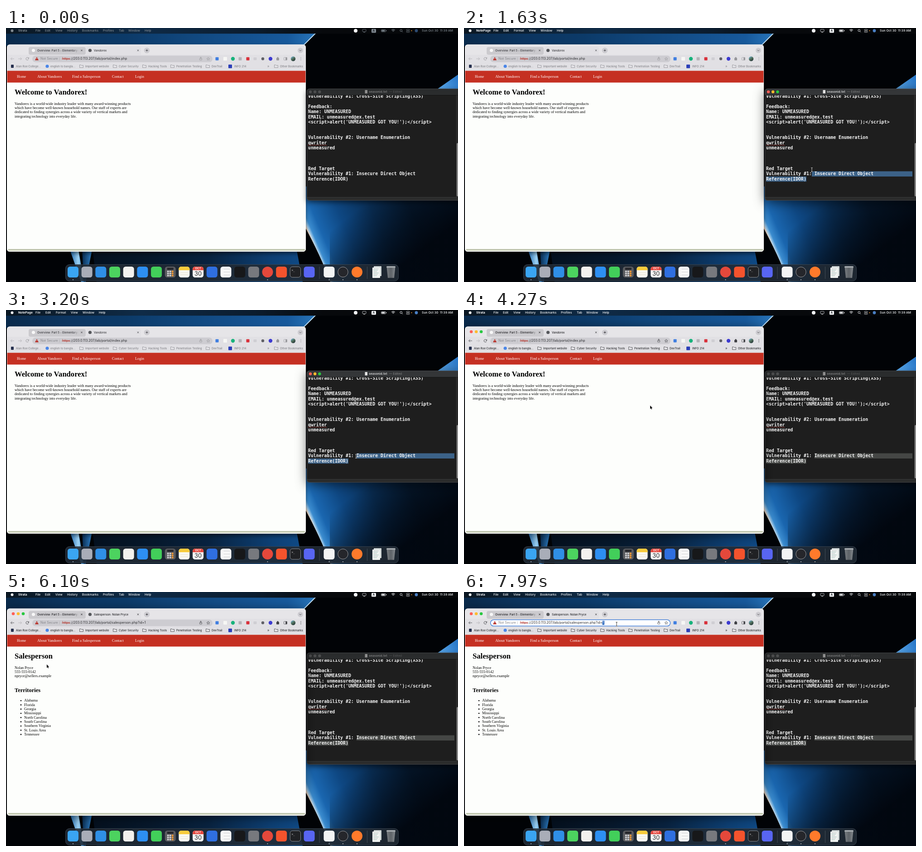
Write an HTML page with a canvas that moves like this. It is 998 px wide and 561 px high and loops after 8 s.

```html
<!DOCTYPE html>
<html lang="en">
<head>
<meta charset="utf-8">
<title>Desktop session</title>
<style>
html, body { margin: 0; width: 100%; height: 100%; overflow: hidden; background: #000; }
canvas { display: block; width: 100vw; height: 100vh; }
</style>
</head>
<body>
<canvas id="stage"></canvas>
<script>
const W = 998, H = 561, LOOP = 8000;
const canvas = document.getElementById('stage');
const g = canvas.getContext('2d');
const dpr = window.devicePixelRatio || 1;
canvas.width = W * dpr;
canvas.height = H * dpr;

const SANS = 'Inter, Roboto, sans-serif';
const SERIF = '"Liberation Serif", "Noto Serif", serif';
const MONO = '"DejaVu Sans Mono", "Liberation Mono", monospace';
const HOST = '203.0.113.207/lab/portal/';

// Moments of the hard changes, in ms
const EDITOR_FOCUS = 1000, DRAG_START = 1150, DRAG_END = 1780;
const BROWSER_FOCUS = 4250, LOAD_START = 5250, LOAD_END = 6000, URL_FOCUS = 7300;

// Pointer path: time, x, y
const PATH = [
  [0, 772, 5], [150, 772, 5], [720, 809, 341], [860, 809, 341], [1000, 757, 334],
  [1150, 757, 334], [1600, 768, 313], [1650, 768, 313], [1780, 773, 323], [3300, 773, 323],
  [4150, 420, 220], [4300, 410, 210], [4950, 178, 107], [5220, 178, 107], [5370, 126, 137],
  [5700, 60, 168], [6000, 60, 168], [6450, 293, 106], [6640, 293, 106], [6770, 329, 78],
  [7100, 337, 71], [8000, 337, 71]
];

const NOTES = {
  0: 'Vulnerability #1: Cross-Site Scripting(XSS)',
  2: 'Feedback:',
  3: 'Name: UNMEASURED',
  4: 'EMAIL: unmeasured@ex.test',
  5: "<script>alert('UNMEASURED GOT YOU!');<\/script>",
  8: 'Vulnerability #2: Username Enumeration',
  9: 'qwriter',
  10: 'unmeasured',
  14: 'Red Target',
  15: 'Vulnerability #1: Insecure Direct Object',
  16: 'Reference(IDOR)'
};

const STATES = ['Alabama', 'Florida', 'Georgia', 'Mississippi', 'North Carolina',
  'South Carolina', 'Southern Virginia', 'St. Louis Area', 'Tennessee'];

const STRIP = '#e6e5e8', BAR = '#e1e0e4', PILL = '#cdccd1';

function rect(x, y, w, h, color, r = 0) {
  g.fillStyle = color;
  g.beginPath();
  g.roundRect(x, y, w, h, r);
  g.fill();
}

function disc(x, y, r, color) {
  g.fillStyle = color;
  g.beginPath();
  g.arc(x, y, r, 0, 7);
  g.fill();
}

function ring(x, y, r, color, width = 0.8, from = 0, to = 2 * Math.PI) {
  g.strokeStyle = color;
  g.lineWidth = width;
  g.beginPath();
  g.arc(x, y, r, from, to);
  g.stroke();
}

function trace(points) {
  g.beginPath();
  for (let i = 0; i < points.length; i += 2) g.lineTo(points[i], points[i + 1]);
}

function poly(points, color) {
  trace(points);
  g.fillStyle = color;
  g.fill();
}

function line(points, color, width = 0.8) {
  trace(points);
  g.strokeStyle = color;
  g.lineWidth = width;
  g.stroke();
}

function box(x, y, w, h, color, r = 1, width = 0.7) {
  g.strokeStyle = color;
  g.lineWidth = width;
  g.beginPath();
  g.roundRect(x, y, w, h, r);
  g.stroke();
}

// y is the optical middle of the line; returns the advance width
function text(s, x, y, size, color, family = SANS, weight = 400) {
  g.font = `${weight} ${size}px ${family}`;
  g.fillStyle = color;
  g.fillText(s, x, y + size * 0.34);
  return g.measureText(s).width;
}

function ramp(x0, y0, x1, y1, stops) {
  const grad = g.createLinearGradient(x0, y0, x1, y1);
  for (const [at, color] of stops) grad.addColorStop(at, color);
  return grad;
}

function withShadow(blur, paint) {
  g.save();
  g.shadowColor = 'rgba(0,0,0,.55)';
  g.shadowBlur = blur * dpr;
  g.shadowOffsetY = 4 * dpr;
  paint();
  g.restore();
}

function pointerAt(t) {
  let i = 1;
  while (i < PATH.length - 1 && PATH[i][0] < t) i++;
  const [t0, x0, y0] = PATH[i - 1], [t1, x1, y1] = PATH[i];
  const u = Math.min(1, Math.max(0, (t - t0) / (t1 - t0)));
  const e = u * u * (3 - 2 * u);
  return { x: x0 + (x1 - x0) * e, y: y0 + (y1 - y0) * e };
}

function drawWallpaper() {
  rect(0, 0, W, H, '#010306');
  // upper band, closed by a bright diagonal rim
  poly([0, 0, 695, 0, 655, 40, 0, 40], ramp(0, 0, 690, 40, [
    [0, '#0a2a4b'], [0.2, '#0c3560'], [0.38, '#0c3a68'], [0.6, '#11487f'], [0.9, '#17599c'], [1, '#2a78bd']]));
  line([694, 1, 655, 40], '#bcdcf2', 2);
  // right wedge
  poly([998, 103, 998, 140, 945, 140], ramp(955, 133, 998, 115, [[0, '#5aa8ea'], [1, '#2a78c8']]));
  // lower right sweep
  g.beginPath();
  g.moveTo(655, 350);
  g.lineTo(998, 350);
  g.lineTo(998, 561);
  g.lineTo(716, 561);
  g.quadraticCurveTo(696, 505, 655, 430);
  g.fillStyle = ramp(690, 505, 900, 415, [
    [0, '#ecd0b8'], [0.015, '#a5cdea'], [0.04, '#3b8ccf'], [0.12, '#1a66af'],
    [0.35, '#0e4782'], [0.65, '#092e55'], [1, '#061d36']]);
  g.fill();
  rect(715, 381, 283, 180, ramp(745, 425, 840, 550, [
    [0, 'rgba(1,5,12,0)'], [0.6, 'rgba(1,5,12,.6)'], [1, 'rgba(1,5,12,.92)']]));
  // lower band
  poly([190, 480, 640, 480, 655, 561, 200, 561], ramp(190, 0, 655, 0, [
    [0, '#04101e'], [0.3, '#06182c'], [0.55, '#08223f'], [0.85, '#0d3f73'], [1, '#0f4a86']]));
  poly([141, 490, 160, 490, 172, 561, 166, 561], ramp(141, 0, 172, 0, [[0, '#1d66ab'], [0.6, '#9dd2f3'], [1, '#2b7cc4']]));
  poly([168, 490, 190, 490, 176, 561, 172, 561], ramp(168, 0, 190, 0, [[0, '#0a2c50'], [1, '#2d7fc6']]));
}

function drawMenuBar(t) {
  const awake = t >= EDITOR_FOCUS;
  const inEditor = awake && t < BROWSER_FOCUS;
  const ink = awake ? '#f2f4f6' : '#7f8890';
  rect(0, 0, W, 12.5, ramp(0, 0, W, 0, [
    [0, '#0b1722'], [0.3, '#0f2b47'], [0.55, '#0b1c2e'], [0.7, '#07090c'], [1, '#06080a']]));
  disc(13.5, 6, 3, ink);
  const items = inEditor
    ? [['File', 65], ['Edit', 87], ['Format', 110], ['View', 143], ['Window', 169], ['Help', 205]]
    : [['File', 65], ['Edit', 86], ['View', 109], ['History', 135], ['Bookmarks', 168],
      ['Profiles', 214], ['Tab', 249], ['Window', 270], ['Help', 306]];
  text(inEditor ? 'NotePage' : 'Strata', 27, 6, 6.7, ink, SANS, 700);
  for (const [label, x] of items) text(label, x, 6, 6.7, ink, SANS, 500);

  disc(772, 6, 4, t < 200 ? '#ffffff' : ink);
  box(787, 3, 8, 5, ink);
  line([789, 9.5, 793, 9.5], ink);
  rect(807, 2, 10, 8.5, ink, 1.5);
  text('A', 809.6, 6.2, 6.5, '#15191d', SANS, 600);
  box(828.5, 3.5, 10, 5, ink, 1.5);
  rect(829.5, 4.5, 7, 3, ink, 0.7);
  rect(839.3, 5, 1, 2, ink);
  for (const r of [2, 4, 6]) ring(855, 9, r, ink, 1, -2.3, -0.84);
  ring(872.3, 5.4, 2.3, ink, 0.9);
  line([874, 7.2, 876, 9.2], ink, 0.9);
  for (const y of [3, 7]) box(884, y, 7, 2.6, ink, 1.3);
  disc(895.5, 6, 1.1, '#f29a2e');
  disc(906, 6, 3.4, awake ? '#4a7fc4' : '#2c4a70');
  text('Sun Oct 30  11:39 AM', 918, 6, 6.8, ink, SANS, 500);
}

function folder(x, y, color) {
  line([x - 4, y + 3, x - 4, y - 3, x - 1, y - 3, x, y - 2, x + 4, y - 2, x + 4, y + 3, x - 4, y + 3], color, 0.7);
}

function cross(x, y, r, color) {
  line([x - r, y - r, x + r, y + r], color, 0.9);
  line([x - r, y + r, x + r, y - r], color, 0.9);
}

function drawTabs(t, active, loading) {
  rect(50, 42, 126, 17, '#cbcace', 4);
  rect(177, 41, 121, 22, BAR, 5);
  const ink = active ? '#232326' : '#3c3c40';
  if (active) [['#fe5f57', 16], ['#febb2e', 27], ['#28c840', 38]].forEach(([c, x]) => disc(x, 48, 3.3, c));
  disc(60.5, 49.5, 3.6, '#f8f8f8');
  g.save();
  g.beginPath();
  g.rect(68, 42, 92, 17);
  g.clip();
  text('Overview: Part 5 - Elementary C', 69, 49.5, 6.2, ink, SANS, 500);
  g.restore();
  rect(148, 44, 13, 12, ramp(148, 0, 161, 0, [[0, 'rgba(203,202,206,0)'], [1, '#cbcace']]));
  cross(167, 49.5, 1.7, ink);
  if (loading) ring(185, 49.5, 3.3, '#aaa9ae', 0.8, t / 130, t / 130 + 1.4);
  else disc(185.5, 49.5, 3.6, '#55575b');
  text(t < LOAD_END ? 'Vandorex' : 'Salesperson: Nolan Pryce', 194, 49.5, 6.2, ink, SANS, 500);
  cross(291.5, 49.5, 1.7, ink);
  disc(311, 49.5, 6.3, PILL);
  line([308.5, 49.5, 313.5, 49.5], ink, 0.9);
  line([311, 47, 311, 52], ink, 0.9);
  disc(650, 49.5, 6, PILL);
  line([647.8, 48.5, 650, 50.7, 652.2, 48.5], ink);
}

function drawUrl(t, typing) {
  const size = 7.3;
  let x = 124;
  const w = text('https', x, 68, size, '#b3352c');
  line([x - 0.5, 68.3, x + w, 68.3], '#b3352c', 0.8);
  x += w;
  const page = t < LOAD_END ? 'index.php' : 'salesperson.php?id=';
  x += text('://' + HOST + page, x, 68, size, '#2c2d30');
  if (t < LOAD_END) return;
  if (typing) rect(x - 0.2, 63.5, 4.6, 9, '#2766bd');
  text('1', x, 68, size, typing ? '#fff' : '#2c2d30');
}

function drawToolbar(t, active, loading) {
  const ink = active ? '#404145' : '#97979b';
  const faint = '#aeadb2';
  const typing = t >= URL_FOCUS;
  rect(2, 59, 660, 35.5, BAR);
  line([18, 68, 10.5, 68], active ? ink : faint);
  line([13.5, 65, 10.5, 68, 13.5, 71], active ? ink : faint);
  line([27, 68, 34.5, 68], faint);
  line([31.5, 65, 34.5, 68, 31.5, 71], faint);
  if (loading) cross(47, 68, 2.6, ink);
  else {
    ring(47, 68, 3, ink, 0.9, 0.4, 5.6);
    poly([50.8, 64.5, 50.8, 67.8, 47.6, 67.8], ink);
  }

  rect(58, 61, 398, 14.5, typing ? '#ffffff' : PILL, 7.2);
  if (typing) box(58.5, 61.4, 397, 13.8, '#2f73d8', 7, 1.3);
  poly([68, 64, 72, 71.3, 64, 71.3], '#b3261e');
  line([68, 66.6, 68, 69], '#fff');
  text('Not Secure', 76, 68, 7.3, '#85858a');
  line([118, 64.5, 118, 71.5], '#a9a9ad', 0.6);
  drawUrl(t, typing);
  box(427.5, 67, 5, 4, ink, 0.8);
  line([430, 69, 430, 64], ink);
  line([428.4, 65.6, 430, 64, 431.6, 65.6], ink);
  const star = [];
  for (let i = 0; i <= 10; i++) {
    const a = i * Math.PI / 5 - Math.PI / 2, r = i % 2 ? 1.6 : 3.6;
    star.push(446.5 + r * Math.cos(a), 68.3 + r * Math.sin(a));
  }
  line(star, ink, 0.7);

  rect(462.5, 64.5, 7, 7, '#3f7ee0', 1);
  rect(480, 64, 8, 8, '#f6f6f4', 1);
  disc(501, 68, 4.2, '#19b37c');
  rect(513.5, 64.5, 7, 7, '#b4b3b8', 1);
  rect(530.5, 64.5, 7, 7, '#d8303a', 1);
  rect(546.5, 65, 7, 6, '#cfced3', 1);
  disc(567, 68, 3.2, '#606167');
  disc(584, 68, 4.2, '#3d3bd0');
  rect(597, 66, 6, 5.5, ink, 1);
  disc(600, 65.6, 1.5, ink);
  box(613.5, 65, 7, 6, ink);
  rect(617.3, 65, 3.2, 6, ink);
  disc(634, 68, 5.2, ramp(630, 63, 637, 73, [[0, '#77b7dc'], [0.5, '#4f6f5a'], [1, '#26343a']]));
  for (const y of [65.2, 68, 70.8]) disc(651, y, 0.75, ink);

  const label = active ? '#2c2d30' : '#85858a';
  const mark = (s, x) => text(s, x, 84.5, 6.1, label, SANS, 500);
  rect(11, 81, 6, 7, '#26304e', 1);
  mark('Alan Roe College...', 22);
  disc(91, 84.5, 3.6, '#4a86e8');
  mark('english to bangla...', 98);
  for (const [name, x] of [['Important website', 175], ['Cyber Security', 249], ['Hacking Tools', 314],
    ['Penetration Testing', 376], ['DevTrail', 454], ['Other Bookmarks', 605]]) {
    folder(x - 8.5, 84.5, label);
    mark(name, x);
  }
  rect(491, 80.8, 8, 8, '#2b3fb8', 1);
  mark('INFO 214', 504);
  text('»', 577, 84, 7.5, label);
}

function drawPage(t) {
  rect(2, 94.5, 660, 394, '#fdfefc');
  rect(2, 94.5, 660, 26, '#c53022');
  for (const [s, x] of [['Home', 24], ['About Vandorex', 69], ['Find a Salesperson', 146], ['Contact', 234], ['Login', 285]])
    text(s, x, 107.6, 8.3, '#fff', SERIF);
  const ink = '#000';
  const body = (s, x, y) => text(s, x, y, 8.28, ink, SERIF);
  if (t < LOAD_END) {
    text('Welcome to Vandorex!', 19, 141.3, 16.6, ink, SERIF, 700);
    ['Vandorex is a world-wide industry leader with many award-winning products',
      'which have become well-known household names. Our staff of experts are',
      'dedicated to finding synergies across a wide variety of vertical markets and',
      'integrating technology into everyday life.'].forEach((s, i) => body(s, 19, 166.7 + i * 9.33));
  } else {
    text('Salesperson', 19, 141.3, 16.6, ink, SERIF, 700);
    ['Nolan Pryce', '555-555-0142', 'npryce@sellers.example'].forEach((s, i) => body(s, 19, 166.7 + i * 9.33));
    text('Territories', 19, 217.2, 12.5, ink, SERIF, 700);
    STATES.forEach((s, i) => {
      const y = 239.5 + i * 9.33;
      disc(33, y + 0.5, 1.3, ink);
      body(s, 40, y);
    });
  }
}

function drawStatus(page, alpha) {
  if (alpha <= 0) return;
  g.save();
  g.globalAlpha = alpha;
  g.font = `400 6.2px ${SANS}`;
  const s = 'https://' + HOST + page;
  const w = g.measureText(s).width + 6;
  rect(2, 484, w, 9.5, '#d9d9dc', [0, 2, 0, 3]);
  box(2, 484, w, 9.5, '#aeaeb2', [0, 2, 0, 3], 0.5);
  text(s, 5, 488.8, 6.2, '#3d3e42');
  g.restore();
}

function drawBrowser(t) {
  const active = t >= BROWSER_FOCUS;
  const loading = t >= LOAD_START && t < LOAD_END;
  withShadow(active ? 22 : 10, () => rect(2, 36.5, 660, 457.5, STRIP, 6));
  g.save();
  g.beginPath();
  g.roundRect(2, 36.5, 660, 457.5, 6);
  g.clip();
  drawTabs(t, active, loading);
  drawToolbar(t, active, loading);
  drawPage(t);
  rect(2, 488, 660, 6, '#f4f5ef');
  rect(5, 488.2, 655, 3.3, '#bfc6ad');
  if (t > 4850 && t < 5650) drawStatus('territories.php', 1);
  if (t > 6400) drawStatus('staff/index.php', Math.min(1, (6930 - t) / 260));
  g.restore();
  box(2.4, 36.9, 659.2, 456.7, 'rgba(255,255,255,.75)', 6, 0.9);
}

const LEFT = 667, CELL = 5.935, PITCH = 11.43;

function drawSelection(t) {
  if (t < DRAG_START) return;
  const p = pointerAt(Math.min(t, DRAG_END));
  const x = LEFT + CELL * Math.round((p.x - LEFT) / CELL);
  const color = t < BROWSER_FOCUS ? '#3c6288' : '#454745';
  const end = LEFT + CELL * 15;
  if (p.y < 328) {
    rect(x, 316.6, 990 - x, 11.4, color);
    rect(LEFT, 328, end - LEFT, 11.3, color);
  } else if (x < end) rect(x, 328, end - x, 11.3, color);
}

function drawEditor(t) {
  const active = t >= EDITOR_FOCUS && t < BROWSER_FOCUS;
  withShadow(active ? 24 : 12, () => rect(664, 134, 345, 247, '#1e1e1e', 6));
  g.save();
  g.beginPath();
  g.rect(664, 148, 334, 226);
  g.clip();
  drawSelection(t);
  for (const i in NOTES) text(NOTES[i], LEFT, 150.5 + i * PITCH, 9.86, '#f4f4f4', MONO, 700);
  g.setLineDash([1.2, 1]);
  line([LEFT, 258.8, LEFT + CELL * 7, 258.8], '#e0493e', 1);
  g.restore();
  rect(664, 134, 345, 14.5, active ? '#343638' : '#2a2c2d', [6, 6, 0, 0]);
  line([664, 148.5, 998, 148.5], '#0b0b0b', 0.7);
  const lights = active ? ['#fe5f57', '#febb2e', '#28c840'] : ['#4c4d4e', '#4c4d4e', '#4c4d4e'];
  lights.forEach((c, i) => disc(672 + i * 10.2, 141, 3.2, c));
  rect(792.5, 137, 5.5, 7.5, active ? '#e4e4e4' : '#8f8f8f', 0.6);
  text('seasonid.txt', 801, 141, 6.8, active ? '#d5d6d7' : '#7c7d7e', SANS, 600);
  text('— Edited', 846, 141, 6.6, active ? '#838485' : '#555657');
  rect(664, 374, 345, 7, '#2a2b2b', [0, 0, 0, 6]);
  line([664, 374, 998, 374], '#47494a', 0.7);
  rect(993.5, 148.5, 5, 225.5, '#292929');
  rect(995, 254, 4, 118, '#8a8a8a', 2);
  box(664.3, 134.3, 345, 246.4, '#5a5c5e', 6, 0.6);
}

function drawDock() {
  rect(131, 522, 736, 37.5, 'rgba(34,43,53,.88)', 9);
  box(131.4, 522.4, 735.2, 36.7, 'rgba(150,165,180,.3)', 9, 0.7);
  const slot = i => 148 + i * 30.68;
  const tile = (x, color) => rect(x - 12, 527, 24, 24, color, 5.5);
  const tiles = ['#3aa5f2', '#a9adb8', '#2f8fe6', '#4cd35f', '#f3f1ee', '#2d8ff2', '#42cf5a', '#5b5c60',
    '#fbf9f0', '#f8f8f8', '#2f6fe0', '#f8f8f8', '#17181a', '#77797e', 0, '#f4532d', '#202124', '#5865f2'];
  tiles.forEach((c, i) => c && tile(slot(i), c));
  disc(slot(14), 539, 12, '#e5483b');

  // calculator keys
  const cx = slot(7);
  rect(cx - 7, 529.5, 14, 4.5, '#24252a', 1);
  for (let r = 0; r < 3; r++)
    for (let k = 0; k < 3; k++) rect(cx - 7 + k * 5, 536 + r * 4.5, 4, 3.5, k === 2 ? '#f09a37' : '#d0d0d3', 1);
  // note pad, calendar, list
  rect(slot(8) - 12, 527, 24, 8, '#f8cb3c', [5.5, 5.5, 0, 0]);
  for (const y of [540, 544.5]) line([slot(8) - 8, y, slot(8) + 8, y], '#d5d2c8', 0.6);
  rect(slot(9) - 12, 527, 24, 8, '#e5483f', [5.5, 5.5, 0, 0]);
  g.textAlign = 'center';
  text('OCT', slot(9), 531.3, 6, '#fff', SANS, 600);
  text('30', slot(9), 543, 13, '#2b2b2d');
  g.textAlign = 'left';
  for (const y of [532.5, 539, 545.5]) line([slot(11) - 5, y, slot(11) + 9, y], '#c4c4c8', 0.8);
  // terminal
  box(slot(16) - 11.6, 527.4, 23.2, 23.2, '#b9babd', 5);
  text('>_', slot(16) - 8.5, 534.5, 6, '#f2f2f2', MONO);

  for (const x of [692, 797.5]) line([x, 527, x, 554], 'rgba(160,170,180,.35)', 0.8);
  tile(713.5, '#f3f4f4');
  disc(744, 539, 11.5, '#25262b');
  ring(744, 539, 11.2, '#b4b5b9');
  disc(775, 539, 12, '#ff7a2b');
  // papers and bin
  rect(812, 526, 17, 22, '#cfd6d6', 1);
  rect(809, 529, 17, 23, '#f1f4f2', 1);
  for (let i = 0; i < 6; i++) line([811, 532 + i * 3, 823 - (i % 3) * 2, 532 + i * 3], i % 2 ? '#8fb3ad' : '#a5aaac', 0.8);
  poly([840.5, 528, 859.5, 528, 857, 552, 843, 552], ramp(840, 0, 860, 0, [[0, '#777c80'], [0.5, '#565b60'], [1, '#868b8f']]));
  rect(840, 526, 20, 3.5, '#a5aaae', 1.7);
  for (let i = 0; i < 5; i++) line([843.5 + i * 3.2, 531, 844.6 + i * 2.7, 550], '#94999d', 0.4);

  for (const x of [148, 577.5, 713.5, 744, 775]) disc(x, 556, 1, '#c4cbd2');
}

function drawPointer(t) {
  const { x, y } = pointerAt(t);
  if (t < 170) return;
  const inNotes = t >= EDITOR_FOCUS && t < BROWSER_FOCUS && x > 664;
  if (inNotes || t > 7050) {
    const stem = (color, width) => {
      line([x, y - 4, x, y + 4], color, width);
      line([x - 1.8, y - 4.6, x, y - 4, x + 1.8, y - 4.6], color, width);
      line([x - 1.8, y + 4.6, x, y + 4, x + 1.8, y + 4.6], color, width);
    };
    stem(inNotes ? '#111' : '#fff', 2);
    stem(inNotes ? '#eee' : '#222', 0.9);
    return;
  }
  const tip = [0, 0, 0, 7.4, 1.7, 5.9, 2.9, 8.5, 4.1, 8, 3, 5.4, 5.2, 5.3, 0, 0]
    .map((v, i) => v + (i % 2 ? y : x));
  line(tip, '#f4f4f4', 1.2);
  poly(tip, '#0c0c0c');
}

function frame(now) {
  const t = now % LOOP;
  g.setTransform(dpr, 0, 0, dpr, 0, 0);
  drawWallpaper();
  if (t < BROWSER_FOCUS) {
    drawBrowser(t);
    drawEditor(t);
  } else {
    drawEditor(t);
    drawBrowser(t);
  }
  drawMenuBar(t);
  drawDock();
  drawPointer(t);
  requestAnimationFrame(frame);
}
requestAnimationFrame(frame);
</script>
</body>
</html>
```
